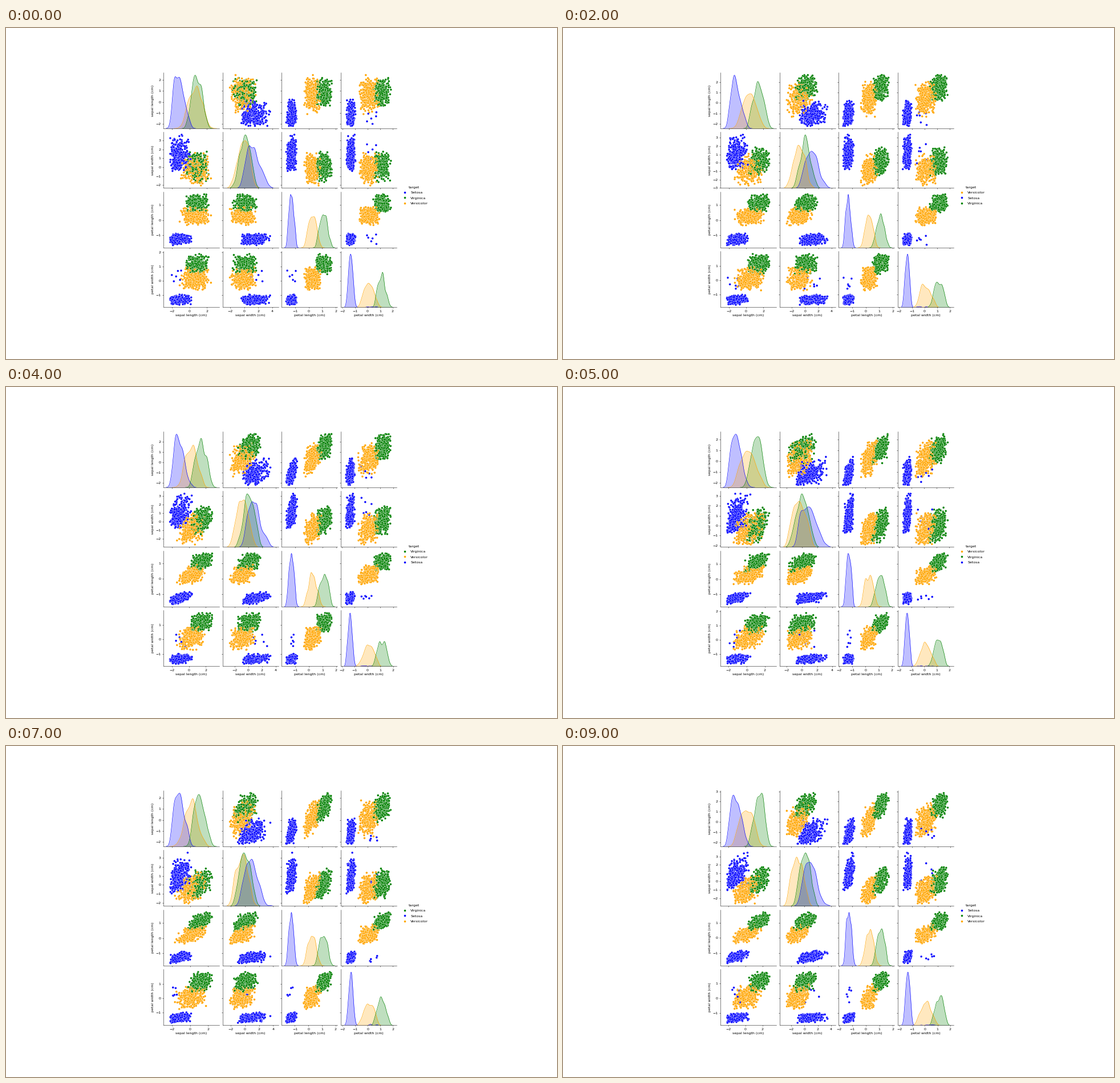
Write a matplotlib script that moves like this. It is 966x580 px and loops after 10000 ms.

```python
import matplotlib.pyplot as plt
import numpy as np
from matplotlib.animation import FuncAnimation

W, H, DPI = 966, 580, 45
LEFT, BOTTOM = 275.8, 489.5     # lower left corner of the panel grid
STEP_X, STEP_Y = 103.7, 104.5   # panel pitch
PANEL_W, PANEL_H = 98, 98
COUNT, STRAYS = 340, 6

LABELS = [f"{part} {size} (cm)" for part in ("sepal", "petal")
          for size in ("length", "width")]
SPECIES = [("Setosa", "blue"), ("Virginica", "green"), ("Versicolor", "orange")]
SETOSA, VIRGINICA, VERSICOLOR = range(3)
ORDERS = "SGV GSV VSG VGS GVS VGS VGS GSV GSV SGV".split()

# one row per species, one column per measure
MEAN = np.array([[-1.15, 1.35, -1.27, -1.35],
                 [1.25, 0.08, 1.10, 1.12],
                 [0.80, -0.58, 0.28, 0.12]])
SPREAD = np.array([[0.54, 0.90, 0.17, 0.15],
                   [0.56, 0.75, 0.27, 0.30],
                   [0.72, 0.78, 0.28, 0.37]])
LOADING = np.array([0.75, 0.65, 0.90, 0.55])

fig = plt.figure(figsize=((W + 0.001) / DPI, (H + 0.001) / DPI), dpi=DPI,
                 facecolor="white")


def centres(t, learned):
    """Cluster centres: two slow drifts and a sway of six steps."""
    sway = np.cos(np.pi * t / 3)
    mean = MEAN.copy()
    mean[SETOSA, 1] -= 0.5 * learned
    mean[VERSICOLOR, 0] -= 0.65 * learned
    mean[VIRGINICA, 0] -= 0.35 * sway
    mean[VERSICOLOR, 1] += 0.43 * sway
    return mean


def make_points(t):
    """Clusters whose measures become more correlated as t grows."""
    rng = np.random.default_rng(40 + t)
    learned = 1 - np.exp(-(t + 0.3) / 2.5)
    load = LOADING * learned
    z = (rng.normal(size=(3, COUNT, 1)) * load
         + rng.normal(size=(3, COUNT, 4)) * np.sqrt(1 - load ** 2))
    z = 2.9 * np.tanh(z / 2.7)
    z[SETOSA, :, :2] += 0.08 * (z[SETOSA, :, :2] ** 2 - 1)
    points = centres(t, learned)[:, None] + SPREAD[:, None] * z
    points[SETOSA, :STRAYS, 3] = rng.uniform(-0.6, 1.0, STRAYS)
    return points, rng.permutation(3 * COUNT)


def kde(values):
    width = values.std() * len(values) ** -0.2
    x = np.linspace(values.min() - 3 * width, values.max() + 3 * width, 200)
    y = np.exp(-0.5 * ((x[:, None] - values) / width) ** 2).sum(axis=1) / width
    return x, y


def limits(values):
    lo, hi = np.min(values), np.max(values)
    pad = 0.05 * (hi - lo)
    return lo - pad, hi + pad


def dots(ax, x, y, color):
    ax.scatter(x, y, s=36, c=color, edgecolors="white", linewidths=0.48)


def draw_curves(ax, curves, order, lo, hi):
    top = 1.05 * max(y.max() for _, y in curves)
    for k in reversed(order):
        x, y = curves[k]
        y = lo + (hi - lo) * y / top
        color = SPECIES[k][1]
        ax.fill_between(x, lo, y, color=color, alpha=0.25, linewidth=0)
        ax.plot(x, y, color=color, lw=1)


def draw_legend(order):
    ax = fig.add_axes([0, 0, 1, 1])
    ax.set(xlim=(0, W), ylim=(H, 0))
    ax.axis("off")
    ax.text(715.5, 281, "target", ha="center", va="baseline")
    for i, k in enumerate(order):
        name, color = SPECIES[k]
        y = 288.2 + 9.3 * i
        dots(ax, [698.7], [y], color)
        ax.text(709.3, y + 2.2, name, va="baseline")


def add_panel(row, col):
    x = LEFT + col * STEP_X
    y = BOTTOM - (3 - row) * STEP_Y
    ax = fig.add_axes([x / W, 1 - y / H, PANEL_W / W, PANEL_H / H])
    ax.patch.set_visible(False)
    ax.spines[["top", "right"]].set_visible(False)
    ax.tick_params(labelleft=col == 0, labelbottom=row == 3)
    if col == 0:
        ax.set_ylabel(LABELS[row])
    if row == 3:
        ax.set_xlabel(LABELS[col])
    return ax


def draw(t):
    fig.clear()
    order = ["SGV".index(letter) for letter in ORDERS[t]]
    points, mix = make_points(t)
    data = points.reshape(-1, 4)[mix]
    colors = np.repeat([color for _, color in SPECIES], COUNT)[mix]
    curves = [[kde(points[k, :, v]) for k in range(3)] for v in range(4)]
    xlim = [limits([x for x, _ in group]) for group in curves]
    ylim = [limits(data[:, v]) for v in range(4)]

    for row in range(4):
        for col in range(4):
            ax = add_panel(row, col)
            if row == col:
                draw_curves(ax, curves[row], order, *ylim[row])
            else:
                dots(ax, data[:, col], data[:, row], colors)
            ax.set(xlim=xlim[col], ylim=ylim[row])
    draw_legend(order)
    return []


anim = FuncAnimation(fig, draw, frames=len(ORDERS), interval=1000, repeat=True,
                     repeat_delay=0, cache_frame_data=False)
plt.show()
```
